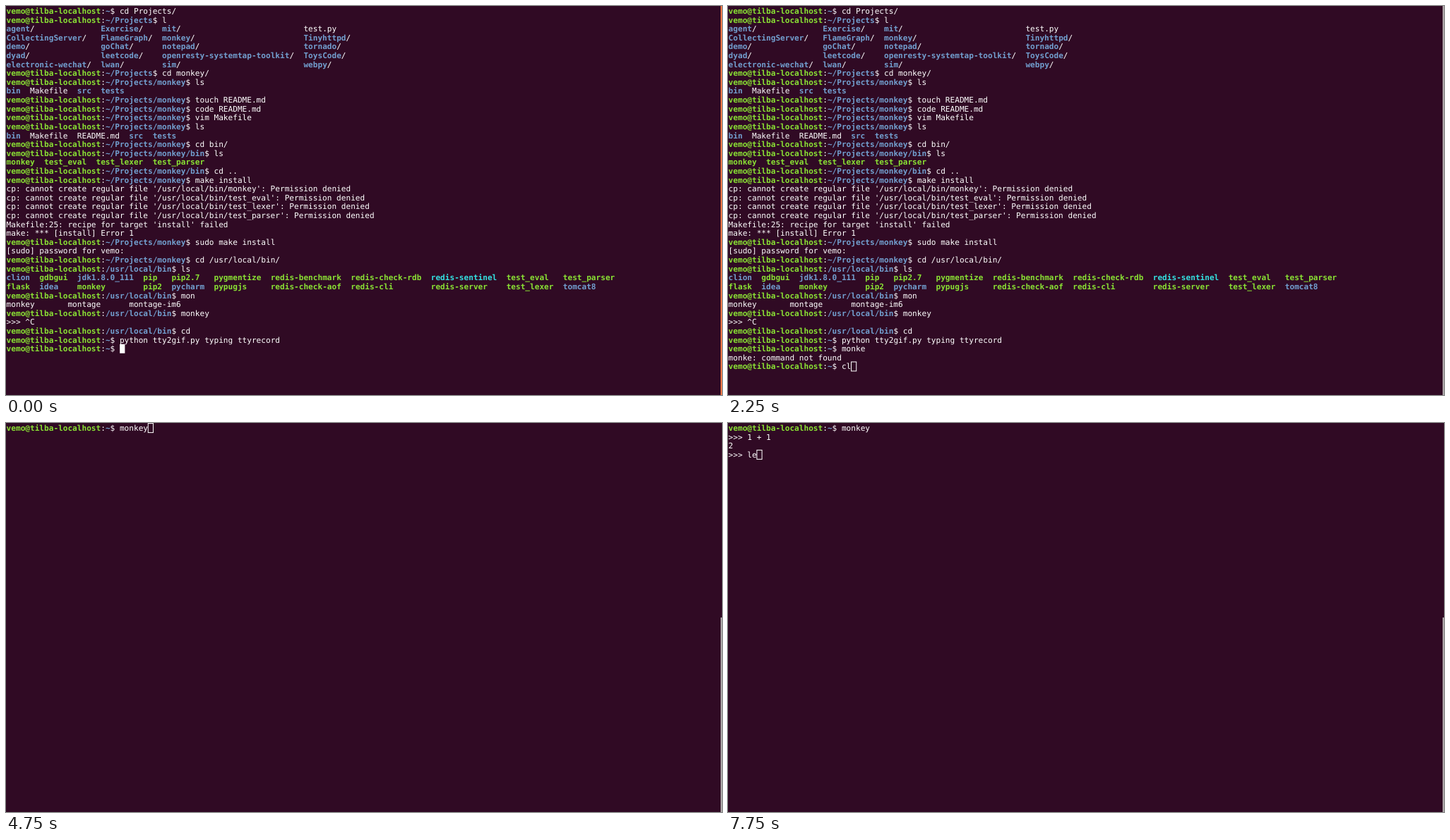
Recreate the animation shown at these times as an HTML page. Size 1014 by 552 pixels, loop 8000 ms.

```html
<!DOCTYPE html>
<html lang="en">
<head>
<meta charset="utf-8">
<title>Terminal session</title>
<style>
  html, body { margin: 0; width: 100%; height: 100%; overflow: hidden; background: #300a24; }
  svg { display: block; width: 1014px; height: 552px; }
  text {
    font: 11.1px "DejaVu Sans Mono", monospace;
    fill: #fff;
    white-space: pre;
    text-rendering: geometricPrecision;
  }
  .g, .b, .c { font-weight: bold; }
  .g { fill: #8ae234; }
  .b { fill: #729fcf; }
  .c { fill: #34e2e2; }
</style>
</head>
<body>
<svg viewBox="0 0 1014 552">
  <rect width="1014" height="552" fill="#300a24"/>
  <g id="screen"></g>
  <rect id="cursor" width="7.2" height="13" stroke="#fff"/>
  <rect id="thumb" x="1012" width="2"/>
</svg>
<script>
const LOOP = 8000, TICK = 250;
const COL = 6.682, ROW = 12.61, LEFT = 0.6, BASE = 11;

// Markup: |g green, |b blue, |c cyan, |w plain white
const prompt = dir => `|gvemo@tilba-localhost|w:|b${dir}|w$ `;
const HOME = prompt('~');
const PROJ = prompt('~/Projects');
const MONKEY = prompt('~/Projects/monkey');
const BIN = prompt('~/Projects/monkey/bin');
const LOCAL = prompt('/usr/local/bin');

// Lay out "column:text" cells on one line
const cells = (...list) => {
  let line = '', width = 0;
  for (const item of list) {
    const cut = item.indexOf(':');
    const col = +item.slice(0, cut), text = item.slice(cut + 1);
    line += ' '.repeat(col - width) + text;
    width = col + text.replace(/\|[gbcw]/g, '').length;
  }
  return line;
};
const dirs = (...names) =>
  cells(...names.map((n, i) => [0, 20, 33, 63][i] + ':' + (n === 'test.py' ? n : `|b${n}|w/`)));
const BIN_COLS = [0, 7, 15, 29, 35, 44, 56, 73, 90, 106, 118];
const bins = list => cells(...list.split(' ').map((n, i) => {
  const hue = /^(clion|jdk|idea|pycharm|tomcat)/.test(n) ? 'b' : n === 'redis-sentinel' ? 'c' : 'g';
  return `${BIN_COLS[i]}:|${hue}${n}`;
}));
const denied = name => `cp: cannot create regular file '/usr/local/bin/${name}': Permission denied`;

const HISTORY = [
  HOME + 'cd Projects/',
  PROJ + 'l',
  dirs('agent', 'Exercise', 'mit', 'test.py'),
  dirs('CollectingServer', 'FlameGraph', 'monkey', 'Tinyhttpd'),
  dirs('demo', 'goChat', 'notepad', 'tornado'),
  dirs('dyad', 'leetcode', 'openresty-systemtap-toolkit', 'ToysCode'),
  dirs('electronic-wechat', 'lwan', 'sim', 'webpy'),
  PROJ + 'cd monkey/',
  MONKEY + 'ls',
  '|bbin|w  Makefile  |bsrc  tests',
  MONKEY + 'touch README.md',
  MONKEY + 'code README.md',
  MONKEY + 'vim Makefile',
  MONKEY + 'ls',
  '|bbin|w  Makefile  README.md  |bsrc  tests',
  MONKEY + 'cd bin/',
  BIN + 'ls',
  '|gmonkey  test_eval  test_lexer  test_parser',
  BIN + 'cd ..',
  MONKEY + 'make install',
  ...['monkey', 'test_eval', 'test_lexer', 'test_parser'].map(denied),
  "Makefile:25: recipe for target 'install' failed",
  'make: *** [install] Error 1',
  MONKEY + 'sudo make install',
  '[sudo] password for vemo:',
  MONKEY + 'cd /usr/local/bin/',
  LOCAL + 'ls',
  bins('clion gdbgui jdk1.8.0_111 pip pip2.7 pygmentize redis-benchmark redis-check-rdb redis-sentinel test_eval test_parser'),
  bins('flask idea monkey pip2 pycharm pypugjs redis-check-aof redis-cli redis-server test_lexer tomcat8'),
  LOCAL + 'mon',
  cells('0:monkey', '13:montage', '26:montage-im6'),
  LOCAL + 'monkey',
  '>>> ^C',
  LOCAL + 'cd',
  HOME + 'python tty2gif.py typing ttyrecord'
];

// from: tick the stage appears; type: tick of its first key
const STAGES = [
  { from: 0, type: 2, above: HISTORY, lead: HOME, keys: 'monke' },
  { from: 7, type: 8, above: [...HISTORY, HOME + 'monke', 'monke: command not found'], lead: HOME, keys: 'clear' },
  { from: 13, type: 14, above: [], lead: HOME, keys: 'monkey' },
  { from: 20, type: 21, above: [HOME + 'monkey'], lead: '>>> ', keys: '1 + 1' },
  { from: 26, type: 30, above: [HOME + 'monkey', '>>> 1 + 1', '2'], lead: '>>> ', keys: 'le' }
];

const $ = id => document.getElementById(id);
const set = (el, attrs) => { for (const k in attrs) el.setAttribute(k, attrs[k]); };
const escape = s => s.replace(/&/g, '&amp;').replace(/</g, '&lt;').replace(/>/g, '&gt;');

const drawLine = (line, row) => {
  const spans = ('|w' + line).split('|').slice(1)
    .map(s => `<tspan class="${s[0]}">${escape(s.slice(1))}</tspan>`).join('');
  return `<text x="${LEFT}" y="${(BASE + row * ROW).toFixed(2)}">${spans}</text>`;
};

function draw(tick) {
  const stage = STAGES.filter(s => s.from <= tick).pop();
  const count = Math.max(0, tick - stage.type + 1);
  const last = stage.lead + stage.keys.slice(0, count);
  const col = last.replace(/\|[gbcw]/g, '').length;
  const row = stage.above.length;
  const focused = tick === 0;
  const top = tick < 12 ? 0 : 276;

  $('screen').innerHTML = [...stage.above, last].map(drawLine).join('');
  set($('cursor'), {
    x: LEFT + 0.2 + col * COL,
    y: 0.6 + row * ROW,
    fill: focused ? '#fff' : 'none',
    'stroke-width': focused ? 0 : 1
  });
  set($('thumb'), { y: top, height: 552 - top, fill: focused ? '#f07746' : '#aaa3a5' });
}

let shown = -1;
const start = performance.now();
function frame() {
  const tick = Math.floor((performance.now() - start) % LOOP / TICK);
  if (tick !== shown) draw(shown = tick);
  requestAnimationFrame(frame);
}
frame();
</script>
</body>
</html>
```
